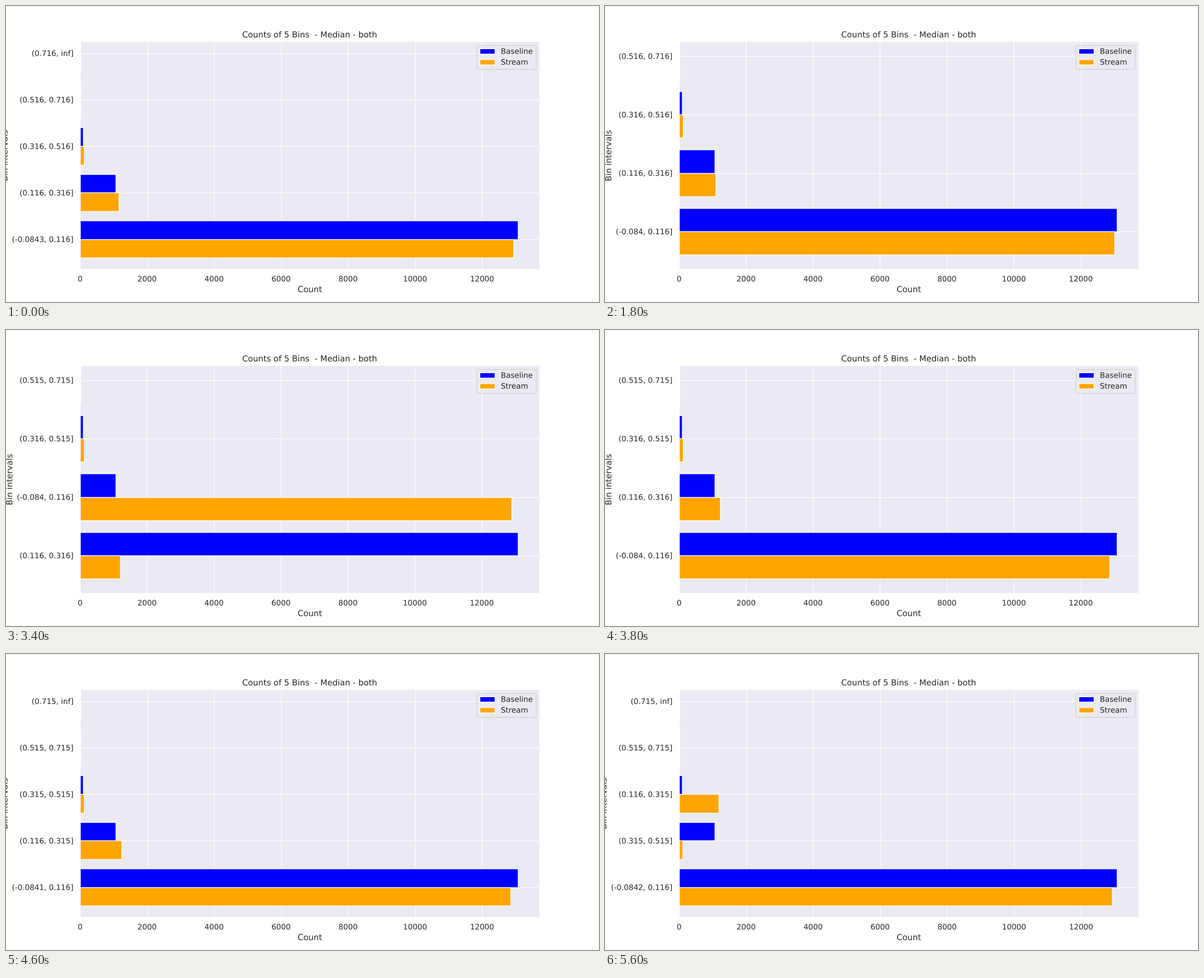
A matplotlib script for the animation above (5800 ms loop, 1058 by 529 pixels).

```python
import matplotlib.pyplot as plt
import numpy as np
from matplotlib.animation import FuncAnimation
from matplotlib.patheffects import Normal
from matplotlib.text import Text
from matplotlib.transforms import Affine2D

W, H, DPI = 1058, 529, 100
FRAMES, STEP_MS = 29, 200
K = W / 1200  # the chart is laid out on 1200 x 600 pixels and scaled down

INK = "#262626"
plt.rcParams.update({
    "font.family": "DejaVu Sans", "text.hinting": "none",
    "text.color": INK, "axes.labelcolor": INK,
    "xtick.color": INK, "ytick.color": INK,
    "axes.facecolor": "#EAEAF2", "axes.edgecolor": "white",
    "axes.linewidth": 1.25 * K,
    "patch.edgecolor": "white", "patch.force_edgecolor": True,
    "patch.linewidth": K,
    "axes.titlesize": 12 * K, "axes.labelsize": 12 * K,
    "axes.titlepad": 6 * K, "axes.labelpad": 4 * K,
    "legend.fontsize": 11 * K,
})
for axis in ("xtick", "ytick"):
    plt.rcParams.update({
        f"{axis}.labelsize": 11 * K,
        f"{axis}.major.size": 6 * K,
        f"{axis}.major.pad": 3.5 * K,
    })
plt.rcParams["xtick.bottom"] = plt.rcParams["ytick.left"] = False

# First frame, bin edges, and which bin stands in each row from the bottom
BINS = [
    (0, "-0.0843 0.116 0.316 0.516 0.716 inf", (0, 1, 2, 3, 4)),
    (3, "-0.0844 0.116 0.316 0.516 0.716", (0, 1, 2, 3)),
    (8, "-0.084 0.116 0.316 0.516 0.716", (0, 1, 2, 3)),
    (11, "-0.0841 0.116 0.316 0.516 0.716", (0, 1, 2, 3)),
    (13, "-0.084 0.116 0.316 0.516 0.716", (0, 2, 1, 3)),
    (14, "-0.084 0.116 0.316 0.516 0.716", (0, 1, 2, 3)),
    (16, "-0.084 0.116 0.316 0.515 0.715", (0, 1, 2, 3)),
    (17, "-0.084 0.116 0.316 0.515 0.715", (1, 0, 2, 3)),
    (19, "-0.084 0.116 0.316 0.515 0.715", (0, 1, 2, 3)),
    (23, "-0.0841 0.116 0.315 0.515 0.715 inf", (0, 1, 2, 3, 4)),
    (25, "-0.0841 0.116 0.315 0.515 0.715 inf", (1, 0, 2, 3, 4)),
    (26, "-0.0842 0.116 0.315 0.515 0.715 inf", (0, 1, 2, 3, 4)),
    (28, "-0.0842 0.116 0.315 0.515 0.715 inf", (0, 2, 1, 3, 4)),
]

# Stream counts of the three lowest bins drift between these points
KEYS = [0, 5, 11, 13, 17, 21, 25, 28]
STREAM = [
    [12943, 13086, 12953, 12935, 12890, 12830, 12876, 12922],
    [1145, 1033, 1130, 1148, 1193, 1265, 1220, 1175],
    [115, 98, 118, 125, 125, 125, 115, 105],
]


def stream_counts(i):
    return [np.interp(i, KEYS, row) for row in STREAM] + [10, 9]


def baseline_counts(i):
    low, mid = (13074, 1062) if 3 <= i < 21 else (13066, 1056)
    return [low, mid, 86, 10, 9]


fig = plt.figure(figsize=(W / DPI, H / DPI), dpi=DPI, facecolor="white")
ax = fig.add_subplot()


def snap(x, y):
    """Move a data point to the nearest pixel centre of the layout grid."""
    px, py = ax.transData.transform((x, y)) / K
    centre = np.array([np.floor(px + 0.5) + 0.5, np.ceil(py - 0.5) - 0.5])
    return ax.transData.inverted().transform(centre * K)


def draw_bars(counts, offset, color, label):
    for row, count in enumerate(counts):
        x0, y0 = snap(0, row + offset)
        x1, y1 = snap(count, row + offset + 0.4)
        ax.barh(y0, x1 - x0, y1 - y0, left=x0, align="edge", color=color,
                snap=False, label=label if row == 0 else None)


def draw_grid(xs, ys):
    style = dict(color="white", lw=K, zorder=0.5, snap=False)
    for x in xs:
        ax.axvline(snap(x, 0)[0], **style)
    for y in ys:
        ax.axhline(snap(0, y)[1], **style)


def draw_legend():
    legend = ax.legend(loc="upper right")
    nudge = Affine2D().translate(K / 2, -K / 2)
    for patch in [legend.get_frame(), *legend.get_patches()]:
        patch.set_snap(False)
        patch.set_transform(patch.get_data_transform() + nudge)


def draw(i):
    _, edges, order = [b for b in BINS if b[0] <= i][-1]
    edges = edges.split()
    labels = [f"({a}, {b}]" for a, b in zip(edges, edges[1:])]
    n = len(order)
    base = baseline_counts(i)[:n]
    counts = stream_counts(i)
    stream = [counts[k] for k in order]
    xs, ys = range(0, 13000, 2000), range(n)

    ax.clear()
    ax.set_xlim(0, 1.05 * max(base + stream))
    ax.set_ylim(-0.65, n - 0.75)
    ax.set_xticks(xs)
    ax.set_yticks(ys, [labels[k] for k in order])
    draw_grid(xs, ys)
    draw_bars(base, 0, "blue", "Baseline")
    draw_bars(stream, -0.4, "orange", "Stream")
    ax.set_title("Counts of 5 Bins  - Median - both")
    ax.set_xlabel("Count")
    ax.set_ylabel("Bin intervals")
    draw_legend()

    for part in [ax.patch, *ax.spines.values()]:
        part.set_snap(False)
    # Outlined glyphs keep their fractional pixel positions
    for text in ax.findobj(Text):
        text.set_path_effects([Normal()])
    return []


anim = FuncAnimation(fig, draw, frames=FRAMES, interval=STEP_MS,
                     init_func=lambda: draw(0), repeat=True, repeat_delay=0)
plt.show()
```
